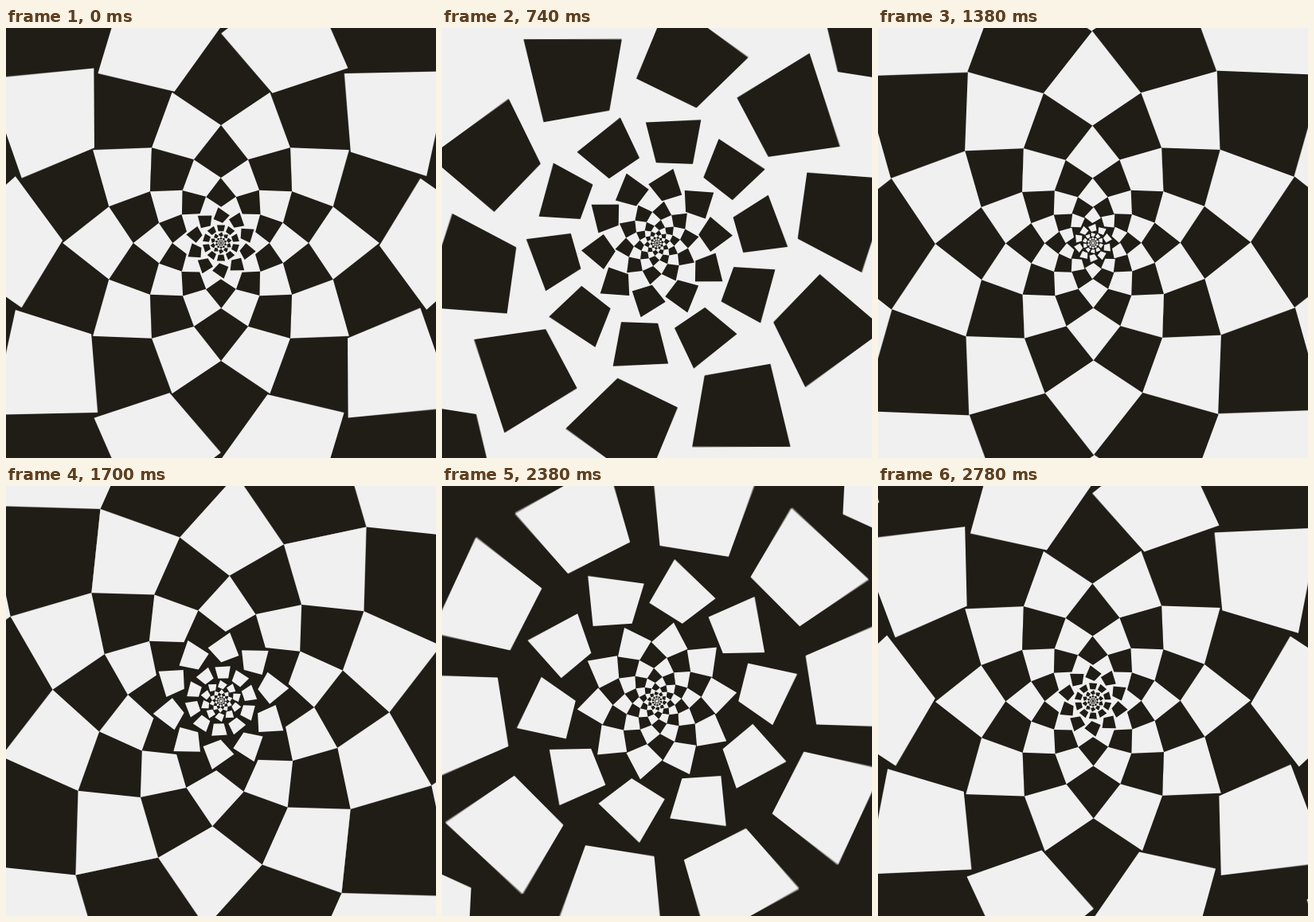
These frames come from a looping animation (540x540 px, 2800 ms). An HTML page with a canvas:

```html
<!DOCTYPE html>
<html lang="en">
<head>
<meta charset="utf-8">
<title>Spiral checkerboard</title>
<style>
  html, body { margin: 0; width: 100%; height: 100%; overflow: hidden; background: #1f1d16; }
  canvas { display: block; }
</style>
</head>
<body>
<canvas id="stage" width="540" height="540"></canvas>
<script>
const SIZE = 540, LOOP = 2800, STEP = 20;
const DARK = '#1f1d16', LIGHT = '#f0f0f0';
const RADIUS = 110.1, RATIO = 1.344, TURN = Math.PI / 10;   // log-polar lattice
const DELAY = 112, START = 149, SPIN = 1050;                // wave timing in ms
const CYCLE = LOOP + 2 * DELAY;
const OUTER = 7, INNER = -17;
const SAMPLES = 5, SHUTTER = 12;

const view = document.getElementById('stage').getContext('2d');
const layer = document.createElement('canvas');
layer.width = layer.height = SIZE;
const ctx = layer.getContext('2d');

const mod = (a, n) => ((a % n) + n) % n;
const ease = p => p < 0.5 ? 2 * p * p : 1 - 2 * (1 - p) * (1 - p);

// Lattice coordinates (ring, column) to a point on the stage
function point(ring, col) {
  const r = RADIUS * RATIO ** ring, a = col * TURN;
  return [SIZE / 2 + r * Math.sin(a), SIZE / 2 - r * Math.cos(a)];
}

function polygon(points) {
  points.forEach((p, i) => i ? ctx.lineTo(...p) : ctx.moveTo(...p));
  ctx.closePath();
}

// Which colour turns at this ring, and how far
function phase(ring, t) {
  const y = mod(t - START - DELAY * ring + 175, CYCLE) - 175;
  const light = y > 1337;
  const p = (light ? y - LOOP / 2 - 2 * DELAY : y) / SPIN;
  const turn = ease(Math.min(1, Math.max(0, p))) * Math.PI / 2;
  return { light, angle: light ? turn : -turn };
}

function drawTiles(e, angle) {
  ctx.beginPath();
  for (let m = 0; m < 10; m++) {
    polygon([0, 1, 2, 3].map(k => {
      const a = angle + k * Math.PI / 2;
      return point(e + Math.cos(a), e + 2 * m + Math.sin(a));
    }));
  }
  ctx.fill();
}

// Everything inside the outer edge of a ring
function fillInside(e) {
  ctx.beginPath();
  polygon(Array.from({ length: 20 }, (_, i) => point(e + 1 - i % 2, e + i)));
  ctx.fill();
}

function drawScene(t) {
  const shift = 2 * t / LOOP;
  let ground = phase(OUTER, t).light;
  ctx.fillStyle = ground ? DARK : LIGHT;
  ctx.fillRect(0, 0, SIZE, SIZE);
  for (let ring = OUTER; ring >= INNER; ring--) {
    const { light, angle } = phase(ring, t);
    if (light !== ground) {
      ground = light;
      ctx.fillStyle = light ? DARK : LIGHT;
      fillInside(ring + shift);
    }
    if ((ring % 2 !== 0) === light) {
      ctx.fillStyle = light ? LIGHT : DARK;
      drawTiles(ring + shift, angle);
    }
  }
}

// Average a few moments for a short motion blur
function render(t) {
  for (let i = 0; i < SAMPLES; i++) {
    drawScene(t + ((i + 0.5) / SAMPLES - 0.5) * SHUTTER);
    view.globalAlpha = 1 / (i + 1);
    view.drawImage(layer, 0, 0);
  }
}

const begin = performance.now();
function tick() {
  const t = Math.max(0, performance.now() - begin) % LOOP;
  render(Math.floor(t / STEP) * STEP);
  requestAnimationFrame(tick);
}
tick();
</script>
</body>
</html>
```
